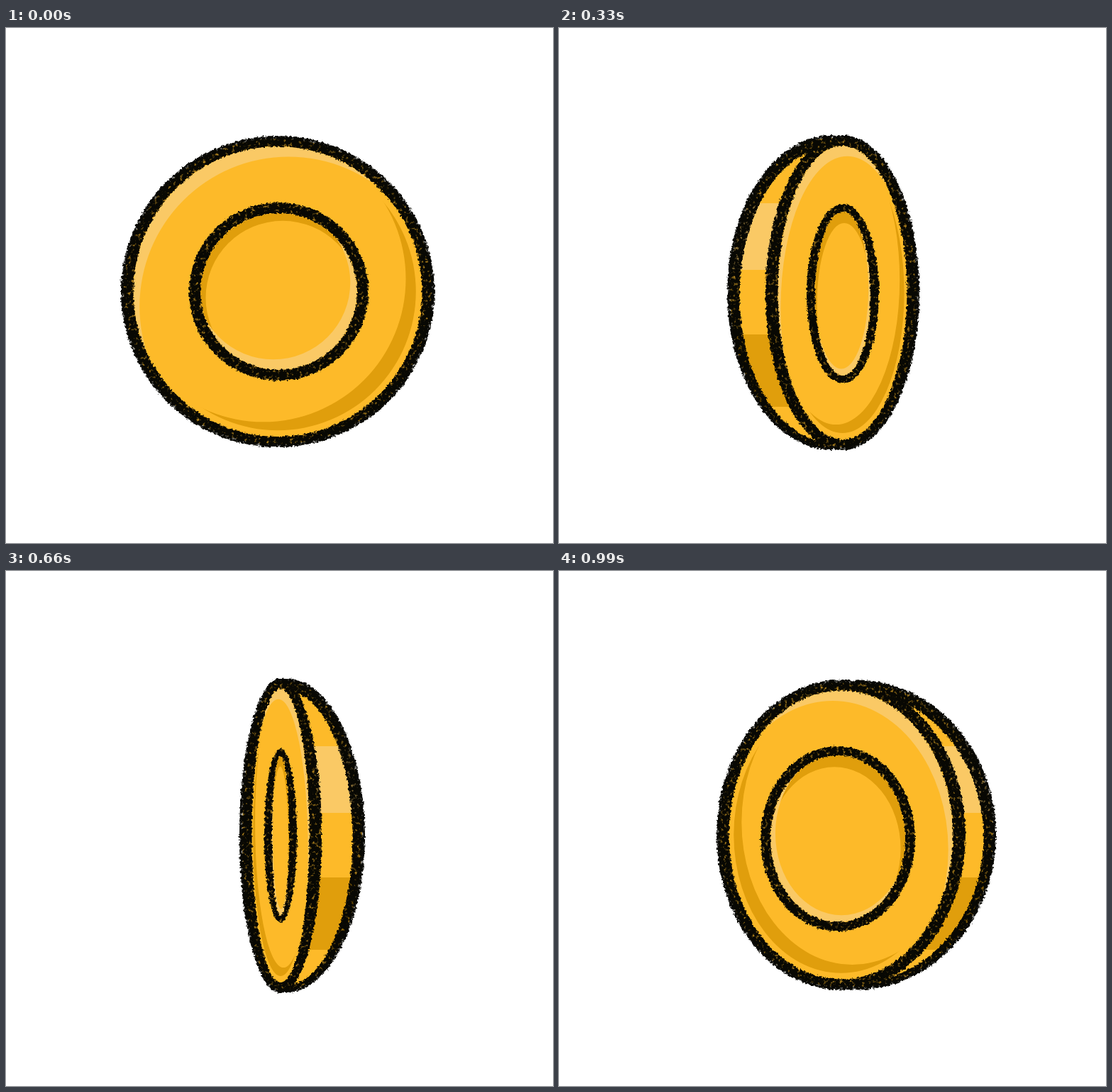
These frames come from a looping animation (771x726 px, 1100 ms). An HTML page with a canvas:

```html
<!DOCTYPE html>
<html lang="en">
<head>
<meta charset="utf-8">
<title>Spinning coin</title>
<style>
  html, body { margin: 0; width: 100%; height: 100%; overflow: hidden; background: #fff; }
  canvas { position: absolute; left: 0; top: 0; }
  #ink { filter: url(#brush); }
  svg { position: absolute; width: 0; height: 0; }
</style>
</head>
<body>
<svg>
  <!-- ragged edges, then faint speckles that let the gold show through -->
  <filter id="brush" x="0" y="0" width="1" height="1" color-interpolation-filters="sRGB">
    <feTurbulence class="noise" type="fractalNoise" baseFrequency=".3" numOctaves="2"/>
    <feDisplacementMap in="SourceGraphic" scale="5.5" xChannelSelector="R" yChannelSelector="G" result="rough"/>
    <feTurbulence class="noise" type="fractalNoise" baseFrequency=".22" numOctaves="3"/>
    <feColorMatrix values="0 0 0 0 0  0 0 0 0 0  0 0 0 0 0  -2.6 0 0 0 2.5"/>
    <feComposite in="rough" operator="in"/>
  </filter>
</svg>
<canvas id="paint" width="771" height="726"></canvas>
<canvas id="ink" width="771" height="726"></canvas>
<script>
const W = 771, H = 726, STEP = 110;
const GOLD = '#fdba29', LIGHT = '#fac965', DARK = '#e09e0c', INK = '#080803';
const paint = document.getElementById('paint').getContext('2d');
const ink = document.getElementById('ink').getContext('2d');
const noise = document.querySelectorAll('.noise');

// face and inner ring: [cx, cy, rx, ry]; side: [left edge, centre x]; flip: sum of mirrored x
const poses = [
  { face: [383, 371.5, 221, 219.5], ring: [384.5, 371.5, 126.5, 125.5], line: 16 },
  { face: [395.5, 372, 175.5, 218.5], ring: [400, 377.5, 109, 130.5], line: 14, side: [177, 375], flip: 793 },
  { face: [392.5, 372.5, 150, 218.5], ring: [397, 375, 86, 132], line: 12, side: [198, 375], flip: 794 },
  { face: [399.5, 373, 108.5, 222], ring: [400, 374.5, 51, 126.5], line: 12, side: [237, 385], flip: 798 },
  { face: [411, 373, 58, 222], ring: [411, 373, 23, 123], line: 11, side: [292, 405], flip: 798 }
];

const inset = ([x, y, rx, ry], dx, dy = dx) => [x, y, rx - dx, ry - dy];

function oval([x, y, rx, ry], path = new Path2D()) {
  path.moveTo(x + rx, y);
  path.ellipse(x, y, rx, ry, 0, 0, 7);
  return path;
}

function halfOval([x, y, rx, ry]) {
  const path = new Path2D();
  path.ellipse(x, y, rx, ry, 0, Math.PI / 2, Math.PI * 1.5);
  path.closePath();
  return path;
}

function fill(c, color, path) {
  c.fillStyle = color;
  c.fill(path, 'evenodd');
}

function clipped(path, draw) {
  paint.save();
  paint.clip(path);
  draw();
  paint.restore();
}

// part of an oval scaled by size that lies outside a shifted oval scaled by cut
function crescent([x, y, rx, ry], color, size, dx, dy, cut) {
  const outside = new Path2D();
  outside.rect(-W, -H, 3 * W, 3 * H);
  oval([x + dx * rx, y + dy * ry, rx * cut, ry * cut], outside);
  clipped(oval([x, y, rx * size, ry * size]), () => fill(paint, color, outside));
}

function band(color, top, bottom) {
  paint.fillStyle = color;
  paint.fillRect(0, top, W, bottom - top);
}

function drawSide([left, x], [, y, , ry]) {
  const rim = [x, y, x - left, ry];
  const body = halfOval(inset(rim, 4));
  fill(paint, GOLD, body);
  clipped(body, () => {
    band(LIGHT, 247, 341);
    band(DARK, 432, 534);
  });
  // the rim line is thinner at the bottom
  const line = halfOval(rim);
  line.addPath(halfOval(inset([x, y + 3.5, x - left, ry], 17.5, 14)));
  fill(ink, INK, line);
}

function drawCoin({ face, ring, line, side }) {
  if (side) drawSide(side, face);
  const plate = inset(face, 17.5, 15), well = inset(ring, line, line - 1);
  fill(paint, GOLD, oval(inset(face, 4)));
  crescent(plate, LIGHT, 1, .075, .103, 1.032);
  crescent(plate, DARK, .957, -.1, -.088, .987);
  crescent(well, DARK, 1, .05, side ? .12 : .08, .982);
  crescent(well, LIGHT, 1, side ? -.055 : -.07, side ? -.065 : -.115, .982);
  fill(ink, INK, oval(plate, oval(face)));
  fill(ink, INK, oval(well, oval(ring)));
}

function drawEdge() {
  const body = new Path2D(), line = new Path2D();
  body.roundRect(360, 159, 73, 430, 22);
  fill(paint, GOLD, body);
  clipped(body, () => {
    fill(paint, LIGHT, new Path2D('M367 210L374 250L412 246L419 210H423V382H420L411 341H374L369 365H366Z'));
    band(DARK, 438, 536);
  });
  line.roundRect(355.5, 154, 82, 440, 27);
  line.addPath(new Path2D('M366 176Q367 165 378 165H414Q426 165 425 175Q420 190 420 215V560Q424 581 411 581H382Q368 581 369 565V225Q369 195 366 176Z'));
  fill(ink, INK, line);
}

function draw(step) {
  const pose = poses[step > 5 ? 10 - step : step];
  for (const c of [paint, ink]) {
    c.setTransform(1, 0, 0, 1, 0, 0);
    c.clearRect(0, 0, W, H);
    if (step > 5) c.setTransform(-1, 0, 0, 1, pose.flip, 0);
  }
  noise.forEach(n => n.setAttribute('seed', step + 1));
  pose ? drawCoin(pose) : drawEdge();
}

const start = performance.now();
let shown = -1;
function tick(now) {
  const step = Math.floor(Math.max(0, now - start) / STEP) % 10;
  if (step !== shown) draw(shown = step);
  requestAnimationFrame(tick);
}
tick(start);
</script>
</body>
</html>
```
